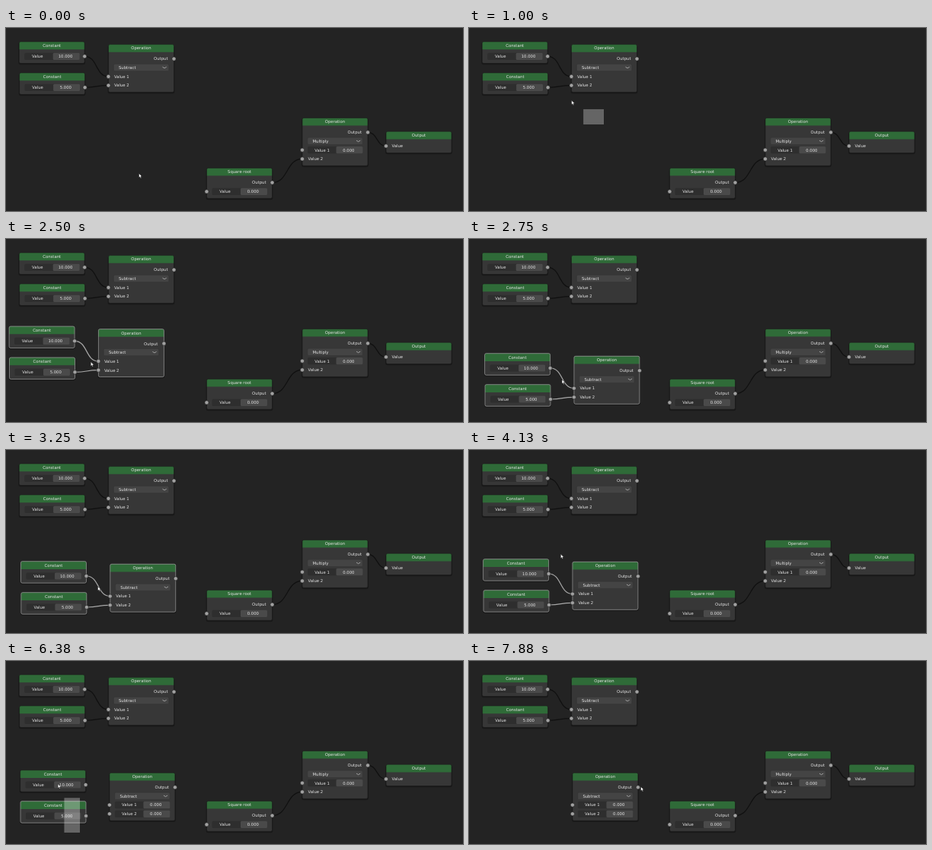
Recreate the animation shown at these times as an HTML page. Size 600 by 241 pixels, loop 8 s.

```html
<!DOCTYPE html>
<html lang="en">
<head>
<meta charset="utf-8">
<title>Node editor</title>
<style>
  html, body { margin: 0; width: 100%; height: 100%; overflow: hidden; background: #232323; }
  svg { display: block; width: 100vw; height: 100vh; }
  text { font: 5.3px "DejaVu Sans", sans-serif; fill: #e4e4e4; text-rendering: geometricPrecision; }
  .shadow { fill: #000; fill-opacity: .3; }
  .body { fill: #373737; }
  .head { fill: #2f6b38; }
  .edge { fill: none; stroke: #191919; stroke-width: .6; }
  .edge.on { stroke: #a2a2a2; stroke-width: .7; }
  .label { fill: #2e2e2e; }
  .value { fill: #4a4a4a; }
  .menu { fill: #444; stroke: #303030; stroke-width: .4; }
  .port { fill: #a1a1a1; stroke: #1a1a1a; stroke-width: .6; }
  .link { fill: none; stroke: #101010; stroke-width: 1.2; }
  .link.on { stroke: #a8a8a8; }
  .chevron { fill: none; stroke: #c8c8c8; stroke-width: .7; }
  .knife { fill: none; stroke: #b4b4b4; stroke-width: .8; }
  .marquee { fill: #fff; fill-opacity: .3; }
  .cursor { fill: #fff; stroke: #111; stroke-width: .5; }
</style>
</head>
<body>
<svg id="stage" viewBox="0 0 600 241" preserveAspectRatio="none"></svg>
<script>
const stage = document.getElementById('stage');
const LOOP = 8000, STEP = 125, W = 86;

// Moments of the story, counted in steps
const SELECT = 5, SELECTED = 13, DUPLICATE = 16, DROP = 28, DESELECT = 36,
  KNIFE = 37, CUT = 45, RESELECT = 48, RESELECTED = 53, DELETE = 57;

const linear = p => p, smooth = p => p * p * (3 - 2 * p),
  easeIn = p => p * p, easeOut = p => p * (2 - p);

// Pointer strokes: first step, last step, x, y, easing
const HOME = [174.5, 191.5], GRAB = [118.6, 52.3];
const STROKES = [
  [0, 3, 177, 127, linear],
  [SELECT, SELECTED, 43, 27, smooth],
  [SELECTED, 15, ...GRAB, smooth],
  [15, 19, 103, 144, easeIn],
  [19, 21.3, 122, 185, linear],
  [23, 27, 120, 178, linear],
  [30, 36.4, 120.5, 121, easeOut],
  [KNIFE, 44, 126, 223, smooth],
  [CUT, RESELECT, 97, 226, linear],
  [RESELECT, 52.2, 61, 146, smooth],
  [59, 63, 225.5, 165.5, smooth]
];

function pointer(k) {
  let [x, y] = HOME;
  for (const [from, to, tx, ty, ease] of STROKES) {
    const p = ease(Math.min(1, Math.max(0, (k - from) / (to - from))));
    x += (tx - x) * p;
    y += (ty - y) * p;
  }
  return [x, y];
}

// Dragged things trail the pointer a little
const trailing = k => pointer(k - .7);

const rect = (cls, x, y, w, h, r = 0) =>
  `<rect class="${cls}" x="${x}" y="${y}" width="${w}" height="${h}" rx="${r}"/>`;
const text = (s, x, y, anchor = 'start') =>
  `<text x="${x}" y="${y + 1.9}" text-anchor="${anchor}">${s}</text>`;
const port = (x, y) => `<circle class="port" cx="${x}" cy="${y}" r="2.6"/>`;

function field(name, value, y) {
  return rect('label', 7, y - 4.6, 72.5, 9.2, 1.5) + rect('value', 44.5, y - 4.6, 35, 9.2, 1.5) +
    text(name, name.length > 5 ? 26 : 24, y, 'middle') + text(value, 60.8, y, 'middle');
}

function menu(name, y) {
  return rect('menu', 6.8, y - 4.6, 72.5, 9.2, 1.5) + text(name, 13.5, y) +
    `<path class="chevron" d="M71 ${y - .8}l2.6 1.6l2.6 -1.6"/>`;
}

const output = y => text('Output', 78, y, 'end') + port(W, y);

function input(name, y, linked) {
  return (linked ? text(name, 7.5, y) : field(name, '0.000', y)) + port(0, y);
}

function node(title, x, y, h, content, on) {
  return `<g transform="translate(${x} ${y})">` +
    rect('shadow', -.8, .8, W + 1.6, h + 1, 2.5) + rect('body', 0, 0, W, h, 2) +
    `<path class="head" d="M0 10.2V2q0-2 2-2h${W - 4}q2 0 2 2v8.2z"/>` +
    rect('edge' + (on ? ' on' : ''), 0, 0, W, h, 2) +
    text(title, W / 2, 5, 'middle') + content + '</g>';
}

const constant = (value, x, y, on) =>
  node('Constant', x, y, 28.5, field('Value', value, 19.3) + port(W, 19.3), on);

const operation = (name, x, y, linked1, linked2, on) =>
  node('Operation', x, y, 63, output(19) + menu(name, 30.5) +
    input('Value 1', 42.3, linked1) + input('Value 2', 54, linked2), on);

function link(x0, y0, x1, y1, on) {
  const bend = (x1 - x0) * .55;
  return `<path class="link${on ? ' on' : ''}" d="M${x0} ${y0}C${x0 + bend} ${y0} ${x1 - bend} ${y1} ${x1} ${y1}"/>`;
}

// Two constants feeding a subtraction: x, y, height
const PLACES = [[17.2, 18, 28.5], [17.6, 59, 28.5], [134.5, 21.6, 63]];

function cluster([dx, dy], selected, linked, constants) {
  const [a, b, op] = PLACES.map(([x, y]) => [x + dx, y + dy]);
  let out = '';
  if (linked) {
    out += link(a[0] + W, a[1] + 19.3, op[0], op[1] + 42.3, selected[0] || selected[2]) +
      link(b[0] + W, b[1] + 19.3, op[0], op[1] + 54, selected[1] || selected[2]);
  }
  if (constants) out += constant('10.000', ...a, selected[0]) + constant('5.000', ...b, selected[1]);
  return out + operation('Subtract', ...op, linked, linked, selected[2]);
}

function marquee(start, k) {
  const [x0, y0] = pointer(start), [x, y] = trailing(k);
  return { x: Math.min(x, x0), y: Math.min(y, y0), w: Math.abs(x - x0), h: Math.abs(y - y0) };
}

const touched = (box, [dx, dy]) => PLACES.map(([x, y, h]) =>
  box.x < x + dx + W && box.x + box.w > x + dx && box.y < y + dy + h && box.y + box.h > y + dy);

const NONE = [false, false, false], ALL = [true, true, true];

function draw(k) {
  const held = trailing(Math.min(k, DROP));
  const offset = [held[0] - GRAB[0], held[1] - GRAB[1]];
  let box = null, first = NONE, copy = NONE;

  if (k > SELECT && k < SELECTED) {
    box = marquee(SELECT, k);
    first = touched(box, [0, 0]);
  } else if (k >= SELECTED && k < DUPLICATE) first = ALL;

  if (k >= DUPLICATE && k < DESELECT) copy = ALL;
  else if (k > RESELECT && k < RESELECTED) {
    box = marquee(RESELECT, k);
    copy = touched(box, offset);
  } else if (k >= RESELECTED && k < DELETE) copy = [true, true, false];

  let out = link(475, 137.4, 499, 155.4) + link(349.5, 203.6, 389, 172.4) +
    operation('Multiply', 389, 118.4, false, true) +
    node('Square root', 263.5, 184.4, 40, output(19.2) + input('Value', 31, false)) +
    node('Output', 499, 136.2, 28.3, input('Value', 19.2, true)) +
    cluster([0, 0], first, true, true);

  if (k >= DUPLICATE) out += cluster(offset, copy, k < CUT, k < DELETE);
  if (box) out += rect('marquee', box.x, box.y, box.w, box.h);
  if (k > KNIFE && k < CUT) {
    const trail = [];
    for (let i = KNIFE; i <= k; i++) trail.push(pointer(i).join());
    out += `<polyline class="knife" points="${trail.join(' ')}"/>`;
  }
  const [x, y] = pointer(k);
  stage.innerHTML = out +
    `<path class="cursor" transform="translate(${x} ${y})" d="M0 0V5.6L1.3 4.5L2.2 6.5L3.2 6L2.3 4.1L4.1 4Z"/>`;
}

let shown = -1;
function tick() {
  const k = Math.floor(performance.now() % LOOP / STEP);
  if (k !== shown) draw(shown = k);
  requestAnimationFrame(tick);
}
tick();
</script>
</body>
</html>
```
